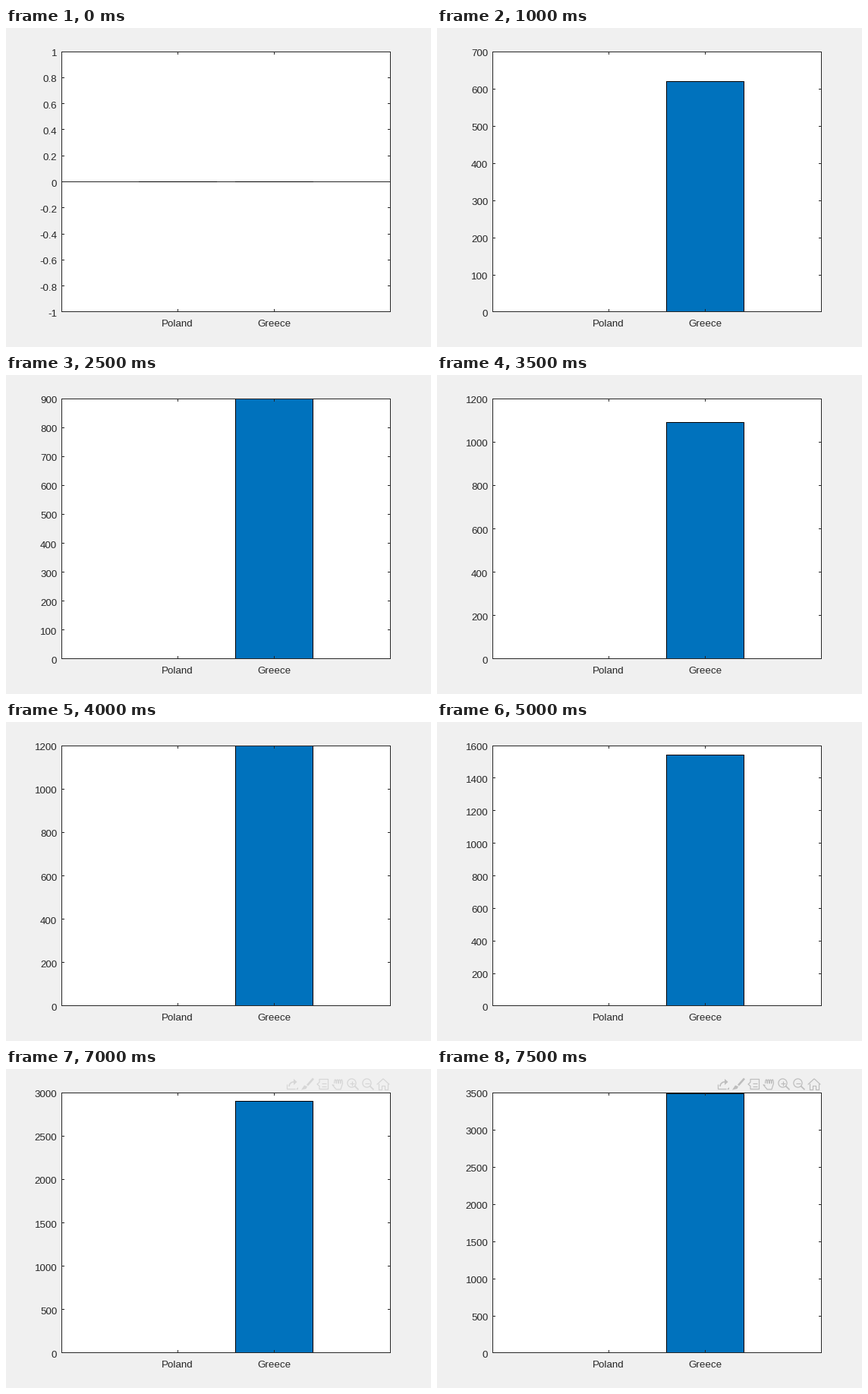
Animation, 560 px wide and 420 px high, one loop 8000 ms. Source, as a matplotlib script:

```python
import math

import matplotlib.pyplot as plt
import numpy as np
from matplotlib.animation import FuncAnimation
from matplotlib.patches import Circle, Polygon, Rectangle

DPI = 100
WIDTH, HEIGHT = 560, 420
LEFT, RIGHT, TOP, BOTTOM = 73, 506, 31, 373
SPAN = BOTTOM - TOP + 1
TICK = 3
FONT_PX = 40 / 3
BACK, AXIS, BLUE = "#f0f0f0", "#262626", "#0072bd"
NAMES = ("Poland", "Greece")
FRAMES, START, TOOLBAR_START = 16, 2, 13
KEY_FRAMES = (2, 3, 5, 8, 10, 12, 15)
KEY_VALUES = (620, 700, 900, 1200, 1543, 2000, 3489)

plt.rcParams["font.family"] = "Liberation Sans"
fig = plt.figure(figsize=(WIDTH / DPI, HEIGHT / DPI), dpi=DPI, facecolor=BACK)
ax = fig.add_axes([0, 0, 1, 1])


def points(px):
    return px * 72 / DPI


def box(x0, y0, x1, y1, color):
    """Fill whole pixels, both corners included."""
    ax.add_patch(Rectangle((x0, y0), x1 - x0 + 1, y1 - y0 + 1, fc=color, lw=0))


def stroke(xs, ys, color, width=1.2):
    ax.plot(xs, ys, color=color, lw=points(width), solid_capstyle="butt",
            solid_joinstyle="round")


def label(x, y, text, ha):
    ax.text(x, y, text, fontsize=points(FONT_PX), color=AXIS, ha=ha, va="baseline")


def advance(text):
    return FONT_PX * sum({".": 0.278, "-": 0.333}.get(c, 0.556) for c in text)


def bar_value(frame):
    """Growth is exponential between the key points."""
    if frame < START:
        return 0
    return round(math.exp(np.interp(frame, KEY_FRAMES, np.log(KEY_VALUES))))


def scale(value):
    """Lower limit, upper limit and tick values: at most ten round steps."""
    if value == 0:
        return -1, 1, [k / 5 for k in range(-5, 6)]
    step = next(s for s in (100, 200, 500) if value <= 10 * s)
    top = math.ceil(value / step) * step
    return 0, top, range(0, top + 1, step)


def category_x(position):
    """The horizontal axis runs from -0.2 to 3.2."""
    return LEFT + (position + 0.2) * (RIGHT - LEFT) / 3.4


def draw_bars(values, to_row):
    base = to_row(0)
    for i, value in enumerate(values):
        x0, x1 = (round(category_x(i + 1 + side)) for side in (-0.4, 0.4))
        top = to_row(value)
        box(x0, top, x1, base, "black")
        if top < base:
            box(x0 + 1, top + 1, x1 - 1, base - 1, BLUE)


def draw_axes(ticks, to_y, to_row):
    for y in (TOP, BOTTOM):
        box(LEFT, y, RIGHT, y, AXIS)
    for x in (LEFT, RIGHT):
        box(x, TOP, x, BOTTOM, AXIS)
    for tick in ticks:
        y, text = to_row(tick), f"{tick:g}"
        box(LEFT, y, LEFT + TICK, y, AXIS)
        box(RIGHT - TICK, y, RIGHT, y, AXIS)
        label(67.25 - advance(text), math.floor(to_y(tick) + 0.5) + 6, text, "left")
    for i, name in enumerate(NAMES):
        x = category_x(i + 1)
        column = round(x)
        box(column, TOP, column, TOP + TICK, AXIS)
        box(column, BOTTOM - TICK, column, BOTTOM, AXIS)
        label(x - 0.2, 393, name, "center")


def export_icon(x, color):
    stroke([x - 7, x - 7, x + 4], [20, 26.4, 26.4], color)
    turn = np.linspace(0, math.pi / 2, 8)
    stroke(x + 2 - 6 * np.cos(turn), 23 - 6 * np.sin(turn), color, 1.6)
    for tip in ([(x + 2, 13), (x + 6.5, 17), (x + 2, 21)],
                [(x + 5, 27), (x + 8, 27), (x + 8, 24)]):
        ax.add_patch(Polygon(tip, fc=color, lw=0))


def brush_icon(x, color):
    stroke([x + 8, x], [12.5, 21.5], color, 2.6)
    ax.add_patch(Polygon([(x - 8, 27.5), (x - 4, 21.5), (x, 23), (x - 1.5, 26)],
                         fc=color, lw=0))


def data_tip_icon(x, color):
    stroke([x - 4, x - 4, x + 7.5, x + 7.5, x - 4, x - 4, x - 7, x - 4],
           [17.5, 13.5, 13.5, 26.5, 26.5, 22.5, 20, 17.5], color)
    for y in (18.5, 22.5):
        stroke([x - 1.5, x + 5], [y, y], color)


def hand_icon(x, color):
    u = np.linspace(0, 1, 41)
    fingers = 19 - 5 * np.sqrt(np.abs(np.sin(4 * math.pi * u)))
    stroke([*(x - 4.5 + 11 * u), x + 4, x - 2, x - 7, x - 4.5],
           [*fingers, 26.8, 26.8, 20.8, 21.5], color)


def zoom_icon(x, color, plus):
    x -= 1.5
    ax.add_patch(Circle((x, 18.5), 5.6, fill=False, ec=color, lw=points(1.2)))
    stroke([x + 4, x + 9], [22.5, 27.3], color, 1.7)
    stroke([x - 3, x + 3], [18.5, 18.5], color)
    if plus:
        stroke([x, x], [15.5, 21.5], color)


def home_icon(x, color):
    for side in (-1, 1):
        stroke([x, x + 8.3 * side], [12.8, 20.5], color)
        stroke([x + d * side for d in (6, 6, 2, 2, 0)],
               [19, 27, 27, 21.8, 21.8], color)


def draw_toolbar(color):
    icons = (export_icon, brush_icon, data_tip_icon, hand_icon,
             lambda x, c: zoom_icon(x, c, True),
             lambda x, c: zoom_icon(x, c, False), home_icon)
    for i, icon in enumerate(icons):
        icon(377 + 20 * i, color)


def draw(frame):
    ax.clear()
    ax.set_xlim(0, WIDTH)
    ax.set_ylim(HEIGHT, 0)
    ax.axis("off")

    value = bar_value(frame)
    low, high, ticks = scale(value)

    def to_y(v):
        return TOP + SPAN * (high - v) / (high - low)

    def to_row(v):
        return min(BOTTOM, math.floor(to_y(v) + 1e-6))

    box(LEFT, TOP, RIGHT, BOTTOM, "white")
    if low < 0:
        box(LEFT, to_row(0), RIGHT, to_row(0), AXIS)
    draw_bars((0, value), to_row)
    draw_axes(ticks, to_y, to_row)

    # the toolbar fades in over the last frames
    if frame > TOOLBAR_START:
        draw_toolbar(str(0.94 - 0.1 * (frame - TOOLBAR_START)))


anim = FuncAnimation(fig, draw, frames=FRAMES, interval=500,
                     repeat=True, repeat_delay=0, blit=False)
plt.show()
```
